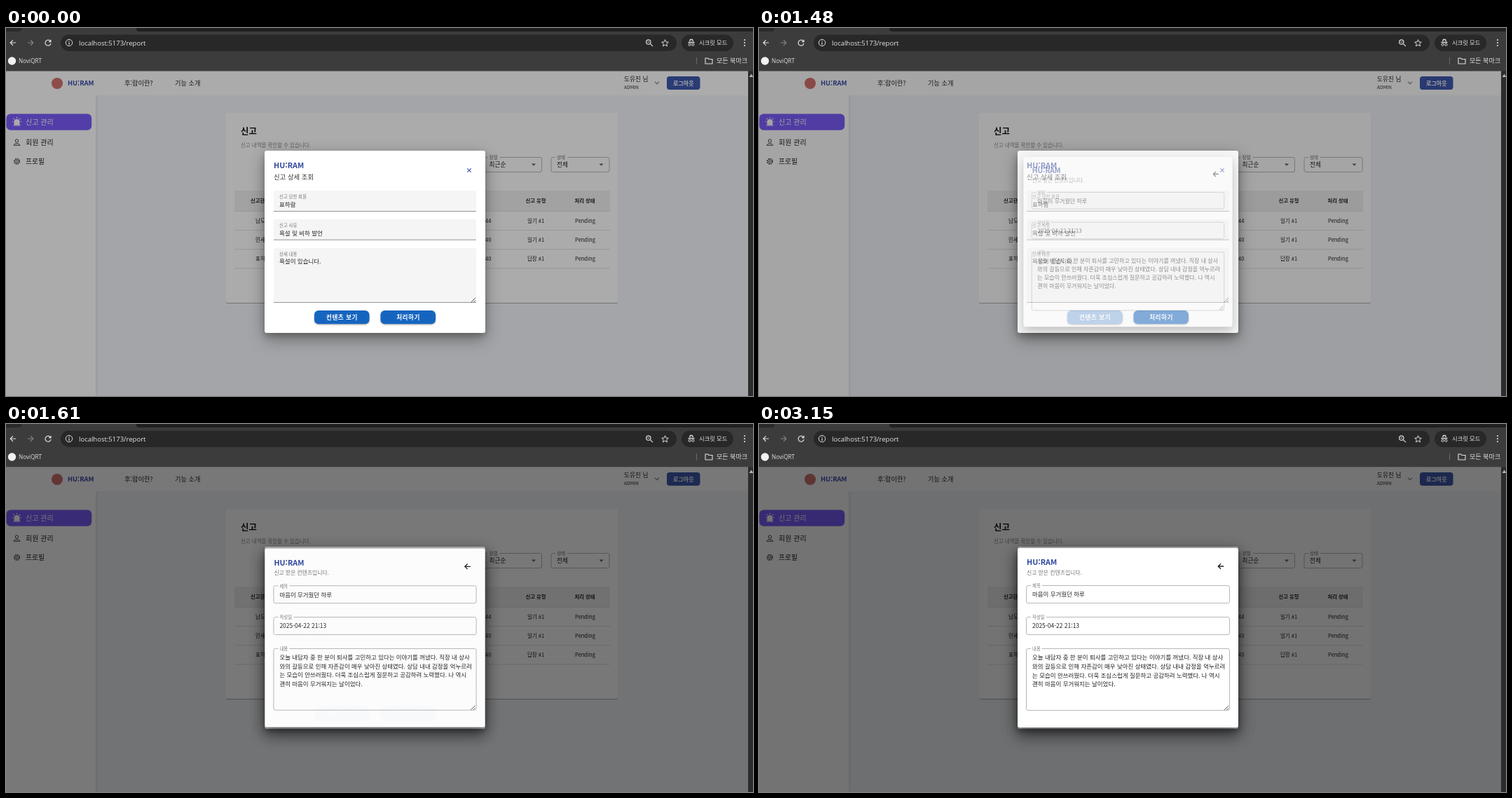
Recreate the animation shown at these times as an HTML page. Size 1066 by 525 pixels, loop 3.28 s.

```html
<!DOCTYPE html>
<html lang="ko">
<head>
<meta charset="utf-8">
<style>
html, body { margin: 0; height: 100%; overflow: hidden; background: #3c3c3c; }
svg { display: block; }
text { font-family: "Noto Sans CJK KR", "Noto Sans KR", sans-serif; white-space: pre; }
.ui text { font-family: "Open Sans", "Noto Sans CJK KR", sans-serif; }
.paper { filter: drop-shadow(0 4px 4px rgba(0,0,0,.2)) drop-shadow(0 8px 11px rgba(0,0,0,.35)); }
.btn { filter: drop-shadow(0 1px 1px rgba(0,0,0,.35)); }
</style>
</head>
<body>
<svg id="stage" width="1066" height="525" viewBox="0 0 1066 525"></svg>
<script>
const LOOP = 3280, DIM = 0.33, BRAND = 'HU:RAM', BLUE = '#2f479e';

// y is the vertical middle of the glyphs
const text = (x, y, size, str, fill = '#222', weight = 400, extra = '') =>
  `<text x="${x}" y="${y + size * 0.37}" font-size="${size}" fill="${fill}" font-weight="${weight}" ${extra}>${str}</text>`;
const mid = (x, y, size, str, fill, weight, extra = '') =>
  text(x, y, size, str, fill, weight, 'text-anchor="middle" ' + extra);
const rect = (x, y, w, h, fill, r = 0, extra = '') =>
  `<rect x="${x}" y="${y}" width="${w}" height="${h}" rx="${r}" fill="${fill}" ${extra}/>`;
const line = (d, stroke, width = 1, extra = '') =>
  `<path d="${d}" fill="none" stroke="${stroke}" stroke-width="${width}" ${extra}/>`;
const circle = (x, y, r, fill, extra = '') =>
  `<circle cx="${x}" cy="${y}" r="${r}" fill="${fill}" ${extra}/>`;
const grip = (x, y) => line(`M${x - 6} ${y}l6 -6M${x - 2.5} ${y}l2.5 -2.5`, '#444', 0.9);

function browser() {
  const pale = '#dedede';
  return '<g class="ui">' +
    rect(0, 0, 1066, 61.5, '#3c3c3c') +
    rect(186, -5, 890, 10, '#202020', 4) + rect(-5, -5, 27, 10, '#2a2a2a', 4) +
    rect(78, 9.5, 879, 23.5, '#282828', 11.75) + rect(964, 9.5, 74, 23.5, '#282828', 11.75) +
    line('M14 21H6.5M10 17.2L6.2 21L10 24.8', pale, 1.2) +
    line('M31 21H38.5M35 17.2L38.8 21L35 24.8', '#858585', 1.2) +
    line('M63.3 18.8A4 4 0 1 0 64 21.8M64 16.8V19.6H61.2', pale, 1.2) +
    circle(90, 21, 4.7, 'none', `stroke="${pale}"`) +
    line('M90 20.5V24M90 18.2V19.4', pale, 1.2) +
    text(104, 21.3, 9.5, 'localhost:5173/report', '#e6e6e6') +
    circle(916.8, 20, 3.2, 'none', `stroke="${pale}" stroke-width="1.2"`) +
    line('M919.2 22.4L923 26.2M915.3 20H918.3', pale, 1.2) +
    line('M940.5 16.6L941.9 19.9L945.3 20.2L942.7 22.5L943.5 25.9L940.5 24.1L937.5 25.9L938.3 22.5L935.7 20.2L939.1 19.9Z', pale) +
    line('M973.5 20.5H982.5M975.5 19L976.5 16.5H979.5L980.5 19', pale, 1.3) +
    circle(975.6, 23.7, 1.6, 'none', `stroke="${pale}"`) +
    circle(980.4, 23.7, 1.6, 'none', `stroke="${pale}"`) +
    text(989, 21, 8.3, '시크릿 모드', '#e6e6e6') +
    [17, 21, 25].map(y => circle(1054, y, 1.1, pale)).join('') +
    circle(8.5, 47, 5.7, '#f2f2f2') + text(18, 47, 8.2, 'NoviQRT', pale) +
    line('M985.5 42V52', '#6a6a6a') +
    line('M998 43H1001.5L1003 44.5H1008V51H998Z', pale, 1.1) +
    text(1014, 46.8, 9.1, '모든 북마크', pale) +
    rect(1059, 61.5, 7, 464, '#2c2c2c') +
    '<path d="M1060.5 70L1063.5 65.5L1066.5 70Z" fill="#b5b5b5"/></g>';
}

function select(x, label, value) {
  return rect(x, 184.5, 83, 21, 'none', 2.5, 'stroke="#b8b8b8"') +
    rect(x + 6, 183, 17, 4, '#fff') + text(x + 8, 185, 6.5, label, '#666') +
    text(x + 8, 195, 8.7, value) +
    `<path d="M${x + 68.5} 193.5h6l-3 3.2z" fill="#666"/>`;
}

function page() {
  const rows = [['남도윤', '44', '일기 #1'], ['민세화', '40', '일기 #1'], ['표하람', '40', '답장 #1']];
  const head = '#222';
  return rect(0, 61.5, 1059, 464, '#f3f6fa') +
    rect(0, 96, 128, 430, '#fff', 0, 'style="filter:drop-shadow(1px 0 2px rgba(0,0,0,.1))"') +
    rect(0, 61.5, 1059, 34.5, '#fff') +
    circle(73, 79, 8, '#d4726e') + text(88, 79, 9.4, BRAND, '#3949ab', 700) +
    text(169, 79, 9.2, '후:람이란?', '#222', 500) + text(241, 79, 9.2, '기능 소개', '#222', 500) +
    text(882, 73, 8.7, '도유진 님', '#222', 500) + text(882, 85, 6.7, 'ADMIN', '#333') +
    line('M926 76.7L929 79.7L932 76.7', '#999', 1.5) +
    rect(943, 69, 47.5, 19, '#3f5aae', 4) + mid(966.8, 78.7, 8, '로그아웃', '#fff', 700) +
    rect(0.5, 122.5, 121.7, 23.3, '#7c5cfc', 6) +
    '<path d="M11.5 138.5V134a4 4 0 0 1 8 0v4.5z" fill="#fff"/>' +
    line('M10.5 139H20.5M15.5 127V128.7M10.7 129L12 130.2M20.3 129L19 130.2M9 133.5H10.5M20.5 133.5H22', '#fff', 1.2) +
    text(28, 134.3, 10, '신고 관리', '#fff', 500) +
    circle(15.5, 161, 2.2, 'none', 'stroke="#444"') + line('M11 167.3C11.5 164 19.5 164 20 167.3Z', '#444') +
    text(28, 163.3, 10, '회원 관리', '#222', 500) +
    circle(15.5, 190.3, 3.6, 'none', 'stroke="#444" stroke-width="2" stroke-dasharray="1.7 1.1"') +
    circle(15.5, 190.3, 1.6, 'none', 'stroke="#444"') +
    text(28, 190.3, 9.8, '프로필', '#222', 500) +
    rect(314, 121, 559, 271, '#fff', 2, 'style="filter:drop-shadow(0 1px .7px rgba(0,0,0,.3))"') +
    text(335, 147.5, 12.4, '신고', '#111', 700) +
    text(335, 166.8, 7.46, '신고 내역을 확인할 수 있습니다.', '#888') +
    select(681.5, '정렬', '최근순') + select(778, '상태', '전체') +
    rect(326, 232, 536, 29, '#f1f1f1') +
    text(349, 246.5, 7.4, '신고한 회원', head, 700) +
    mid(756, 246.5, 7.3, '신고 유형', head, 700) + mid(826, 246.5, 7.3, '처리 상태', head, 700) +
    line('M326 261.3H862', '#e0e0e0') +
    rows.map(([who, min, kind], i) => {
      const y = 275 + i * 27.2;
      return text(356, y, 7.5, who) + text(684, y, 7.5, min) + mid(756, y, 7.5, kind) +
        mid(826.5, y, 7.5, 'Pending') + line(`M326 ${y + 13.5}H862`, '#e0e0e0');
    }).join('') +
    rect(0, 61.5, 1059, 464, '#000', 0, `opacity="${DIM}"`);
}

function filled(y, h, label, value) {
  return rect(382, y, 289, h, '#f5f5f5', 2) + line(`M382 ${y + h}H671`, '#949494') +
    text(390, y + 8.4, 6.4, label, '#777') +
    text(390, y + (h > 40 ? 18.5 : 19.8), 8.5, value);
}

function button(x, label, glow = '') {
  return `<g class="btn">${rect(x, 403, 78.5, 19.3, '#1565c0', 6)}${glow}</g>` +
    mid(x + 39.5, 413, 8.6, label, '#fff', 700, 'letter-spacing=".5"');
}

function report() {
  return rect(369, 175, 315, 260, '#fff', 3, 'class="paper"') +
    text(382, 196, 10.8, BRAND, BLUE, 700) +
    text(382, 213, 9.4, '신고 상세 조회', '#333', 500) +
    line('M658.3 200.3L663.7 205.7M663.7 200.3L658.3 205.7', '#3f5aae', 1.2) +
    filled(232, 29.5, '신고 당한 회원', '표하람') +
    filled(273, 29.2, '신고 사유', '욕설 및 비하 발언') +
    filled(314, 77.5, '상세 내용', '욕설이 있습니다.') + grip(670, 391) +
    button(440, '컨텐츠 보기', rect(440, 403, 78.5, 19.3, '#fff', 6, 'id="glow" opacity="0"')) +
    button(534.5, '처리하기');
}

function outlined(y, h, label, lines) {
  return rect(381.5, y, 290, h, 'none', 2.5, 'stroke="#b8b8b8"') +
    rect(388, y - 2, label.length * 6 + 4, 4, '#fff') + text(390, y + 0.5, 6.4, label, '#777') +
    lines.map((s, i) => text(390, y + 12.8 + i * 12.6, 8.48, s)).join('');
}

function content() {
  return rect(369, 177, 315, 256, '#fff', 3, 'class="paper"') +
    text(382, 197.5, 10.8, BRAND, BLUE, 700) +
    text(382, 212, 7.85, '신고 받은 컨텐츠입니다.', '#777') +
    line('M663.2 203H655.4M659 199.2L655.2 203L659 206.8', '#222', 1.3) +
    outlined(230.5, 25, '제목', ['마음이 무거웠던 하루']) +
    outlined(275.5, 25, '작성일', ['2025-04-22 21:13']) +
    outlined(320.5, 88, '내용', [
      '오늘 내담자 중 한 분이 퇴사를 고민하고 있다는 이야기를 꺼냈다. 직장 내 상사',
      '와의 갈등으로 인해 자존감이 매우 낮아진 상태였다. 상담 내내 감정을 억누르려',
      '는 모습이 안쓰러웠다. 더욱 조심스럽게 질문하고 공감하려 노력했다. 나 역시',
      '괜히 마음이 무거워지는 날이었다.']) + grip(670, 408);
}

const $ = id => document.getElementById(id);
$('stage').innerHTML = page() + report() +
  rect(0, 61.5, 1059, 464, '#000', 0, 'id="shade"') +
  `<g id="content">${content()}</g>` + browser();

const clamp = v => Math.min(1, Math.max(0, v));

function draw() {
  const t = performance.now() % LOOP;
  const p = 1 - (1 - clamp((t - 1410) / 230)) ** 1.7;
  const scale = 0.9 + 0.1 * p;
  $('shade').setAttribute('opacity', DIM * p ** 3);
  $('content').setAttribute('opacity', p);
  $('content').setAttribute('transform',
    `translate(526.5 305) scale(${scale}) translate(-526.5 -305)`);
  // press feedback on the first button
  $('glow').setAttribute('opacity', 0.5 * clamp((t - 1270) / 200) * clamp((1620 - t) / 140));
  requestAnimationFrame(draw);
}
draw();
</script>
</body>
</html>
```
